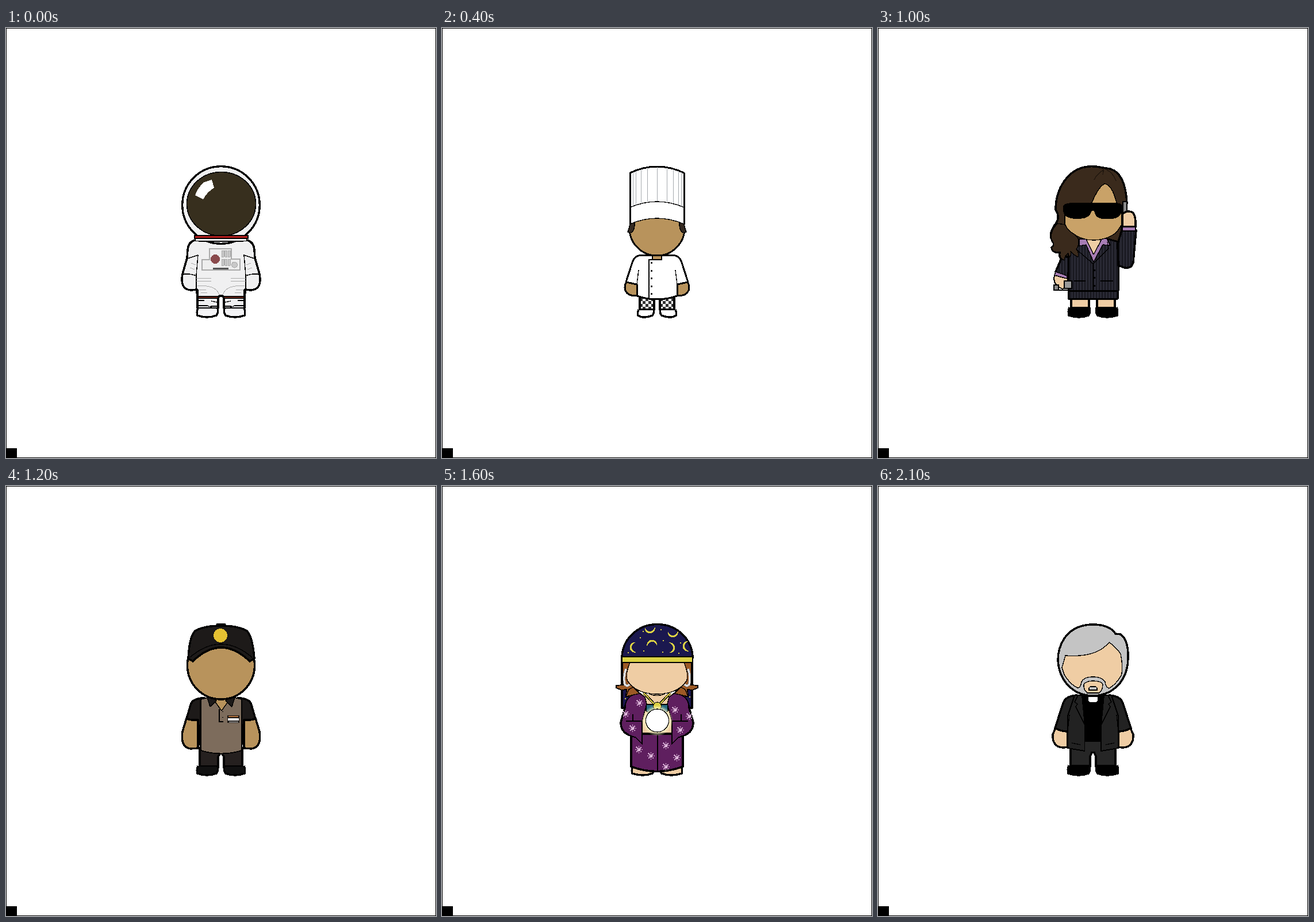
These frames come from a looping animation (748 px wide and 748 px high, 2.2 s). An HTML page:

```html
<!DOCTYPE html>
<html lang="en">
<head>
<meta charset="utf-8">
<title>Jobs</title>
<style>
html, body { margin: 0; width: 100%; height: 100%; overflow: hidden; background: #fff; }
svg { display: block; width: 100vw; height: 100vh; shape-rendering: crispEdges; stroke-linejoin: round; }
</style>
</head>
<body>
<svg id="stage" viewBox="0 0 748 748"></svg>
<script>
const INK = '#000';
const pen = (w, ink) => w ? ` stroke="${ink}" stroke-width="${w}"` : '';
const path = (d, fill = 'none', w = 0, ink = INK) => `<path d="${d}" fill="${fill}"${pen(w, ink)}/>`;
const bold = (d, fill) => path(d, fill, 3.5);
const thin = (d, fill) => path(d, fill, 1.4);
const line = (d, ink, w = 1) => path(d, 'none', w, ink);
const box = (x, y, w, h, fill, sw = 0, ink = INK) => path(`M${x} ${y}h${w}v${h}h${-w}z`, fill, sw, ink);
const oval = (x, y, rx, ry, fill, w = 0, ink = INK) =>
  `<ellipse cx="${x}" cy="${y}" rx="${rx}" ry="${ry}" fill="${fill}"${pen(w, ink)}/>`;
const flip = s => `<g transform="matrix(-1 0 0 1 748 0)">${s}</g>`;
const both = s => s + flip(s);

function shoe(fill, x = 332, y = 487) {
  const side = `Q${x - 1} ${y + 8} ${x + 1} 500Q350 506 366 500Q370 495 368 ${y}`;
  return bold(`M${x + 2} ${y}${side}`, fill) + thin(`M${x + 3} ${y}H367`);
}

const checks = (id, size, light, dark, x, y) =>
  `<pattern id="${id}" x="${x}" y="${y}" width="${size * 2}" height="${size * 2}" patternUnits="userSpaceOnUse">` +
  box(0, 0, size * 2, size * 2, light) + box(0, 0, size, size, dark) + box(size, size, size, size, dark) + '</pattern>';

const defs = `<defs>
${checks('trouser', 5, '#fff', '#333', 344, 470)}
${checks('band', 6, '#e4e4e4', '#000', 320, 273)}
${checks('tie', 3, '#eee', '#111', 362, 375)}
<pattern id="pin" width="5" height="8" patternUnits="userSpaceOnUse">
${box(0, 0, 5, 8, '#1c1c24')}${box(2, 0, 1, 8, '#393947')}</pattern>
<radialGradient id="glow"><stop offset=".7" stop-color="#fff7c8"/><stop offset="1" stop-color="#fff7c8" stop-opacity="0"/></radialGradient>
</defs>`;

function astronaut() {
  const suit = '#f0f0f1', grey = '#aaa';
  let vents = '';
  for (const x of [375, 380.5, 386]) for (const y of [387, 402]) vents += box(x, y, 4, 11, '#c9c9c9', 1, grey);
  return bold('M329 369H419Q431 372 432 386L433 400L441 428Q446 455 426 456L416 455V461H332V455L322 456Q302 455 307 428L315 400L316 386Q317 372 329 369Z', suit)
    + both(
      path('M334 455H374V466H370V489H334Z', suit) +
      line('M333 455V488M374 466H371L369 471V488', INK, 3.5) +
      box(334, 467, 35, 3, '#b5432f', 1.4) +
      thin('M335 474H345M335 483H350L358 486M357 475L367 477M356 484H367') +
      shoe('#f4f4f6', 332, 487))
    + both(
      thin('M316 401L334 395L331 430V456M308 428Q321 427 331 431') +
      line('M331 435H357M331 440H357M333 449Q366 446 371 465M335 455H348M339 460H350M322 409L330 412M320 417L328 420', grey))
    + oval(374, 308, 67.3, 67.3, suit, 3.4) + oval(374.5, 306, 60, 55.5, '#372f1e', 1.6)
    + path('M345 268L358 264L362 278Q350 285 343 298L329 291Q333 278 345 268Z', '#fff')
    + box(328, 361, 93, 5, '#b8201f', 2.5) + box(330, 367, 88, 3, suit) + box(335, 370, 78, 1.5, INK)
    + path('M354 384H392V402H407V421H341V403H354Z', '#eee', 1.4, grey) + vents
    + oval(397.5, 412, 5, 5, '#c9c9c9', 1, grey) + box(360, 417, 27, 3, '#555')
    + oval(364, 402, 8, 8, '#8a4a4c');
}

function chef() {
  const skin = '#b8935c';
  let pleats = '';
  for (const x of [332, 337, 346, 357, 374, 391, 402, 411, 416]) {
    const bow = 11 * (1 - ((x - 374) / 47) ** 2);
    pleats += `M${x} ${253 - bow}V${312 - bow}`;
  }
  return both(
      bold('M344 466V490H369V472Z', 'url(#trouser)') + shoe('#fff', 340, 490) +
      path('M321 441Q315 452 321 460Q327 467 339 465V446Z', skin, 3))
    + path('M366 395H345Q334 397 331 408L320 442L339 446V466Q374 478 409 466V446L428 442L417 408Q414 397 403 395Z', '#fff', 3)
    + both(thin('M342 421L339 446V465'))
    + path('M328 325V340L326 348A48 48 0 0 0 422 348L420 340V325Z', skin, 3)
    + thin('M366 397V403H382V397', skin)
    + both(path('M327 338H335Q336 350 330 356L323 355L326 346Z', '#352a22', 1.4))
    + path('M327 341Q374 321 421 341V252Q374 230 327 252Z', '#fff', 1.4)
    + path('M327 342V252Q374 230 421 252V342', 'none', 3)
    + line(pleats, '#a5a9ad') + thin('M327 312Q374 292 421 312')
    + thin('M360 471V403H383')
    + [408, 422, 435, 449, 462].map(y => box(363, y - 1, 3, 3, '#222')).join('');
}

function police() {
  const skin = '#89633b', vest = '#1e1f21';
  return both(
      bold('M337 446V488H369V471L372 466V446Z', '#222226') + shoe('#000', 334, 486) +
      bold('M318 410L310 434Q306 457 323 458L334 456V410Z', skin) +
      bold('M343 372Q327 374 325 384L318 410Q326 413 335 411L341 400Z', '#fff'))
    + box(355, 372, 38, 22, '#fff')
    + path('M342 374H356L359 392H390L392 374H407V400L413 410V440H335V410L341 402Z', vest, 2.5)
    + path('M368 380L374 375L380 380L387 391L374 394L362 391Z', 'url(#tie)', 1)
    + both(thin('M356 375L362 386L368 379M341 401H357V376'))
    + box(393, 389, 14, 13, '#151618', 2) + line('M400 403V438', INK, 4) + line('M403 405V438', '#444')
    + box(371, 398, 8, 4, 'url(#tie)') + box(366, 404, 18, 4, 'url(#tie)')
    + line('M344 412H404M344 419Q360 422 374 421Q390 422 404 419M374 412V438M344 412V438M404 412V438', INK, 1.6)
    + box(335, 440, 78, 8, INK)
    + oval(350, 435, 7, 7, 'none', 3, '#111') + oval(350, 435, 5, 5, 'none', 1, '#555')
    + box(342, 443, 16, 17, '#1b1b1d', 2)
    + oval(374, 318, 56, 57, skin, 3.5)
    + both(path('M318 303H331Q330 319 325 323H318Z', '#2b2119', 1))
    + path('M320 278V253Q323 240 374 240Q425 240 428 253V278Q440 278 440 291Q439 304 423 304H325Q309 304 308 291Q308 278 320 278Z', INK, 2)
    + path('M320 273H428V282L420 291H328L320 282Z', 'url(#band)')
    + oval(374, 268, 10, 11, '#e9e9e9');
}

function agent() {
  const skin = '#c9a268', pale = '#efcda4', hair = '#3a2a1c', suit = 'url(#pin)', lilac = '#a77db4';
  return both(bold('M336 468V488H367V468Z', pale) + shoe('#000', 331, 486))
    + bold('M391 243Q352 234 329 260Q309 283 309 316Q317 329 310 339Q296 357 303 370Q309 378 302 382Q304 392 316 390Q314 402 324 404L350 398V372H424V324L433 305Q430 246 397 244Z', hair)
    + bold('M321 396L309 424Q318 431 330 432L336 400Z', suit)
    + path('M331 456H417V471H331Z', suit, 3)
    + path('M350 368L331 392V457H418V372L400 367Z', suit, 3)
    + bold('M417 375L424 352H449L444 408Q441 419 429 417L418 413Z', suit)
    + path('M307 430Q303 447 321 454L330 450V436Z', pale, 2)
    + path('M309 424L329 431V436L307 430Z', lilac, 1.4)
    + box(306, 447, 8, 9, '#888', 1.4) + box(324, 440, 13, 13, '#999', 1.4)
    + line('M307 456H330', INK, 2)
    + path('M361 366H389L375 398Z', pale, 1)
    + thin('M350 367H362L375 394L390 366H398L404 378L391 377L375 407L362 377L350 379Z', lilac)
    + thin('M349 373L345 385L374 410L401 384L399 372M374 410V456M341 440H361M387 440H409')
    + [420, 433, 447].map(y => box(375, y, 3, 3, INK)).join('')
    + path('M303 370Q309 378 302 382Q304 391 317 390Q315 401 324 404Q325 395 331 392L333 399Q337 394 335 388Q341 396 348 398Q350 390 345 385Q351 378 348 366L325 342L312 340Q297 357 303 370Z', hair, 1.4)
    + path('M394 271Q383 277 372 304L325 310V340Q328 350 337 356Q354 369 374 369Q400 369 416 354L424 342V310L415 304Q407 272 394 271Z', skin, 1.4)
    + line('M393 244L391 255M393 246Q380 255 376 264M397 246Q410 253 414 266', '#21170f', 1.4)
    + path('M322 309Q326 304 340 304H410Q425 304 425 310Q426 331 406 332H391Q378 331 376 318Q372 316 370 322Q367 332 346 332Q322 332 322 316Z', INK)
    + box(426, 302, 7, 24, '#888', 2)
    + bold('M425 346V324Q434 316 443 321Q449 327 448 346Z', pale)
    + box(425, 346, 23, 7, lilac, 1.6);
}

function server() {
  const skin = '#b8935c', dark = '#1d1a19';
  return both(
      bold('M337 456V490H369V471L372 466V456Z', '#25201f') + shoe('#111', 332, 487) +
      bold('M314 404L307 427Q303 455 321 457L334 456V406Z', skin) +
      bold('M345 369Q324 369 321 381L314 405Q324 408 334 407L339 458V369Z', dark))
    + path('M339 371L352 368H398L410 371V460Q374 471 339 460Z', '#7d6c5c', 1.8)
    + thin('M360 370H390L375 391Z', skin)
    + both(thin('M350 368L355 384L366 374L360 367Z', dark))
    + thin('M371 388V410H378M377 392V393M377 402V403')
    + box(385, 399, 21, 13, '#1a1512') + box(387, 400, 17, 2, '#b0703b')
    + box(386, 404, 19, 4, '#fff') + line('M388 410H404', '#ddd')
    + oval(374, 312, 58.5, 59, skin, 3.5)
    + box(366, 239, 16, 5, INK)
    + path('M317 300Q319 262 329 252Q345 243 374 243Q403 243 419 252Q429 262 432 300L424 305Q374 257 325 305Z', dark, 3.5)
    + thin('M320 298Q374 252 428 298')
    + oval(373, 260, 12, 12, '#e5c132');
}

function seer() {
  const skin = '#efcda4', robe = '#5f1f5f', navy = '#1b184f', gold = '#dbd144', hair = '#9c5a26';
  const moon = (x, y, a) => `<g transform="translate(${x} ${y}) rotate(${a})">` +
    path('M4 -9A9 9 0 1 0 5 8A8.5 8.5 0 0 1 4 -9Z', gold) + '</g>';
  const star = (x, y) => box(x - 1, y - 1, 3, 3, '#d8a9d4') +
    `<path d="M${x + .5} ${y - 6}v13M${x - 6} ${y + .5}h13M${x - 4} ${y - 4}l9 9M${x - 4} ${y + 5}l9 -9" stroke="#e3bfe0" stroke-width="1.5" stroke-dasharray="1.5 1.3"/>`;
  const dots = [[323, 289], [344, 263], [350, 286], [384, 268], [383, 288], [414, 272], [380, 249], [411, 290], [349, 252], [318, 369], [430, 366]];
  const stars = [[343, 377], [319, 396], [331, 421], [405, 389], [430, 400], [414, 424], [342, 458], [363, 469], [389, 451], [408, 472], [389, 488]];
  return both(
      bold('M313 300V386H340V300Z', navy) + shoe(skin, 330, 488) +
      path('M314 307H330L326 342L344 361L340 368L320 366L321 354L312 355L303 351V347L315 346Z', hair, 1.8))
    + box(344, 362, 60, 72, skin)
    + bold('M329 431H419V488Q374 505 329 488Z', robe) + thin('M375 432V496')
    + thin('M355 380H393V392L375 400L355 392Z', '#286b80')
    + both(
      bold('M345 362Q324 363 320 379L311 411Q311 427 325 433L338 437Z', robe) +
      path('M343 361L353 367L356 379L348 409L349 449L338 437L325 432L320 379Q324 364 343 361Z', robe) +
      thin('M344 361L353 367L356 379L348 409V449L337 437M320 409H348M332 397V409') +
      thin('M320 366L325 354L332 350L344 361Z', hair))
    + thin('M361 362Q374 367 387 362', skin)
    + path('M327 307H421Q429 326 426 338Q410 362 374 362Q338 362 322 338Q319 326 327 307Z', skin, 1.4)
    + both(
      line('M320 318Q315 332 318 345Q322 350 326 345', '#777', 4.5) +
      line('M320 318Q315 332 318 345Q322 350 326 345', '#e2e2e2', 3) +
      line('M351 360L370 380', INK, 4) + line('M351 360L370 380', gold, 2))
    + oval(374.5, 383, 7, 7, gold, 1.2)
    + oval(374.5, 408, 27, 27, 'url(#glow)') + oval(374.5, 408, 20, 20, '#fff', 1.2)
    + bold('M313 299A61 58 0 0 1 436 299Z', navy)
    + moon(334, 281, 0) + moon(362, 249, -90) + moon(365, 275, 90) + moon(398, 281, 180) + moon(402, 256, -90) + moon(426, 279, 0)
    + path('M313 297H436V307H313Z', gold, 2)
    + dots.map(([x, y]) => box(x, y, 2, 2, gold)).join('') + stars.map(s => star(...s)).join('');
}

function priest() {
  const skin = '#efcda4', suit = '#222', grey = '#c4c4c4';
  return both(
      bold('M335 450V488H369V470L372 464V444Z', '#262626') + shoe('#000', 330, 486) +
      bold('M309 421L304 432Q303 455 323 455L330 454V426Z', skin) +
      bold('M346 364Q326 365 322 378L308 421Q318 427 330 427L342 400Z', suit))
    + box(355, 363, 38, 82, INK)
    + both(
      path('M342 364H355L360 416V461L330 456V400Z', suit, 2) +
      thin('M348 364L342 376L347 379L344 384L360 416M333 398L330 426M337 447L352 450'))
    + box(360, 445, 27, 17, '#262626')
    + path('M366 367H382V374L379 376H369L366 374Z', '#fff')
    + bold('M374 241Q341 241 324 265Q313 282 313 303Q315 340 345 358Q374 372 403 358Q434 340 435 300Q436 268 422 258L413 257Q403 241 374 241Z', grey)
    + thin('M320 316L326 295Q380 299 402 272Q414 280 422 292Q427 318 423 330Q413 346 402 352Q396 350 395 341Q390 332 374 332Q358 332 354 341Q352 352 347 351Q334 345 324 328Z', skin)
    + thin('M358 345Q362 339 374 339Q388 339 391 345Q391 355 385 360H364Q357 354 358 345Z', skin)
    + thin('M367 351L369 349H379L381 351V355H367Z', grey);
}

const cast = { a: astronaut, b: chef, c: police, d: agent, e: server, f: seer, g: priest };
const order = 'aegdbfcagedbecadfgbceg';
const STEP = 100;

const stage = document.getElementById('stage');
stage.innerHTML = defs + box(0, 0, 748, 748, '#fff')
  + Object.entries(cast).map(([key, draw]) => `<g id="${key}" visibility="hidden">${draw()}</g>`).join('')
  + box(0.5, 0.5, 747, 747, 'none', 1) + box(0, 731, 19, 17, INK);

let shown = null;
const start = performance.now();
function tick(now) {
  const t = Math.max(0, now - start) % (order.length * STEP);
  const next = document.getElementById(order[Math.floor(t / STEP)]);
  if (next !== shown) {
    if (shown) shown.setAttribute('visibility', 'hidden');
    next.setAttribute('visibility', 'visible');
    shown = next;
  }
  requestAnimationFrame(tick);
}
tick(start);
</script>
</body>
</html>
```
